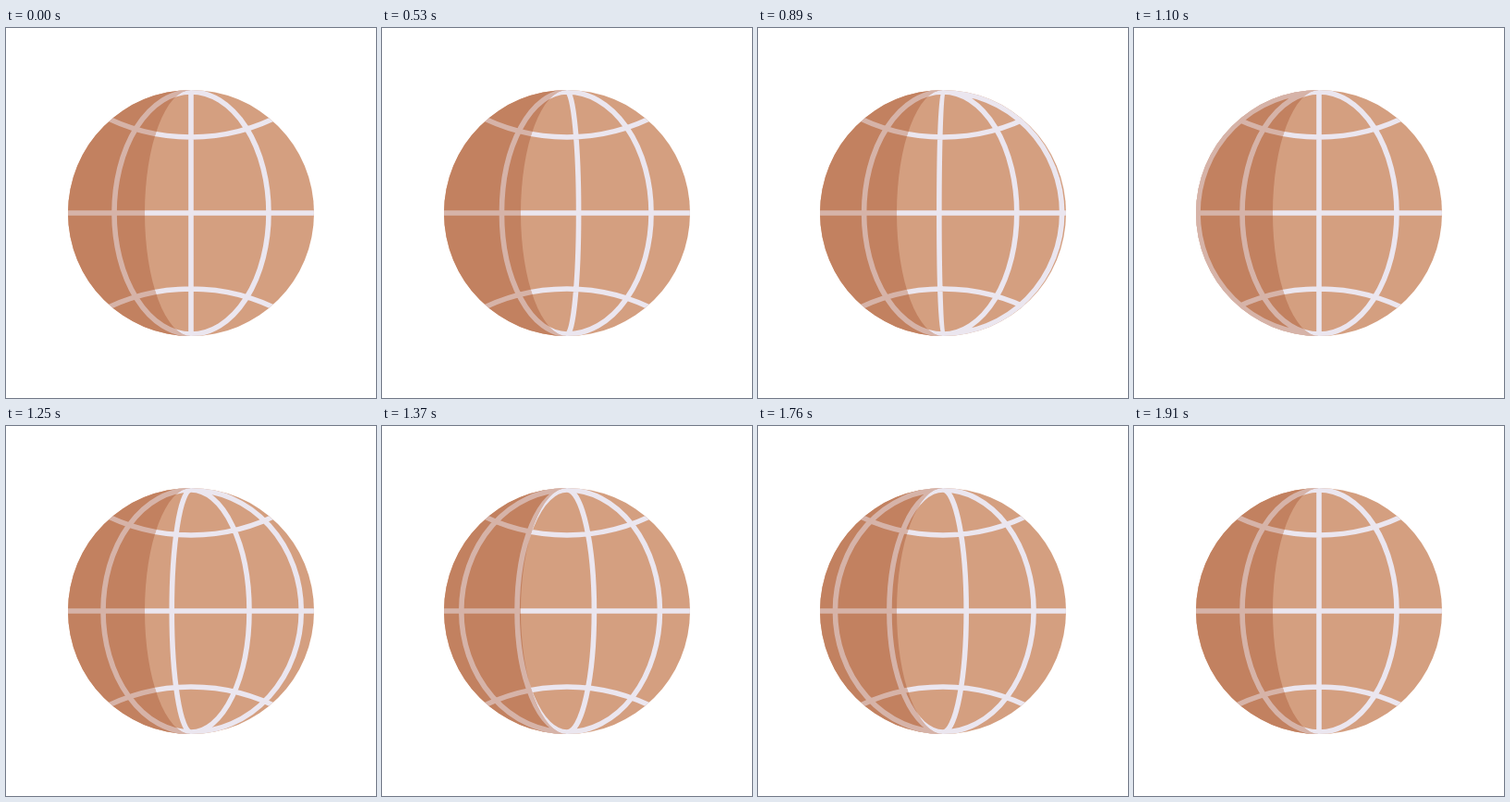
An HTML page with a canvas for the animation above (2000 ms loop, 400x400 px).

```html
<!DOCTYPE html>
<html lang="en">
<head>
<meta charset="utf-8">
<title>Spinning globe</title>
<style>
html, body { margin: 0; width: 100%; height: 100%; overflow: hidden; background: #fff; }
canvas { display: block; width: 100vmin; height: 100vmin; margin: 0 auto; }
</style>
</head>
<body>
<canvas id="stage"></canvas>
<script>
const SIZE = 400, C = 200, R = 133, RY = 131;
const LOOP = 2000, START = 500, FIRST = 530, TICK = 30, TURN = 200, TURNS = 7;
const LIGHT = '#d49f80', DARK = '#c28160', LINE = '#ebe6ef';
const STOPS = [-131, -83, 0, 84, 131];   // meridian offsets at the equator
const ARC_R = 209, ARC_Y = 82;           // parallels

const canvas = document.getElementById('stage');
const ctx = canvas.getContext('2d');
const scale = window.devicePixelRatio || 1;
canvas.width = canvas.height = SIZE * scale;

const disc = new Path2D();
disc.arc(C, C, R, 0, Math.PI * 2);

const shade = new Path2D();
shade.ellipse(C, C, R, R, 0, Math.PI / 2, Math.PI * 1.5);
shade.ellipse(C, C, 50, R, 0, Math.PI * 1.5, Math.PI / 2, true);
shade.closePath();

// Number of meridian steps travelled at time t, advancing in ticks.
function travel(t) {
  if (t < FIRST) return 0;
  const held = FIRST + Math.floor((t - FIRST) / TICK) * TICK;
  return Math.min((held - START) / TURN, TURNS);
}

function addMeridian(path, x) {
  path.moveTo(C, C - RY);
  path.ellipse(C, C, Math.abs(x), RY, 0, -Math.PI / 2, Math.PI / 2, x < 0);
}

function addParallel(path, side) {
  const half = 0.5, mid = side * Math.PI / 2;
  const cy = C + side * (ARC_Y + ARC_R);
  const a = -mid - half;
  path.moveTo(C + ARC_R * Math.cos(a), cy + ARC_R * Math.sin(a));
  path.arc(C, cy, ARC_R, a, -mid + half);
}

function grid(steps) {
  const path = new Path2D();
  const p = steps % 1;
  const entering = steps > 0.2 && steps < TURNS;
  for (let i = entering ? 0 : 1; i < 4; i++) {
    addMeridian(path, STOPS[i] + (STOPS[i + 1] - STOPS[i]) * p);
  }
  path.moveTo(C - R, C);
  path.lineTo(C + R, C);
  addParallel(path, 1);
  addParallel(path, -1);
  return path;
}

function draw(t) {
  const lines = grid(travel(t));
  ctx.setTransform(scale, 0, 0, scale, 0, 0);
  ctx.fillStyle = '#fff';
  ctx.fillRect(0, 0, SIZE, SIZE);
  ctx.lineWidth = 5.6;
  ctx.strokeStyle = LINE;

  ctx.fillStyle = LIGHT;
  ctx.fill(disc);
  ctx.save();
  ctx.clip(disc);
  ctx.stroke(lines);
  ctx.restore();

  // The shaded side shows the lines at half strength.
  ctx.fillStyle = DARK;
  ctx.fill(shade);
  ctx.save();
  ctx.clip(shade);
  ctx.globalAlpha = 0.5;
  ctx.stroke(lines);
  ctx.restore();
}

const began = performance.now();
function tick() {
  draw((performance.now() - began) % LOOP);
  requestAnimationFrame(tick);
}
tick();
</script>
</body>
</html>
```
